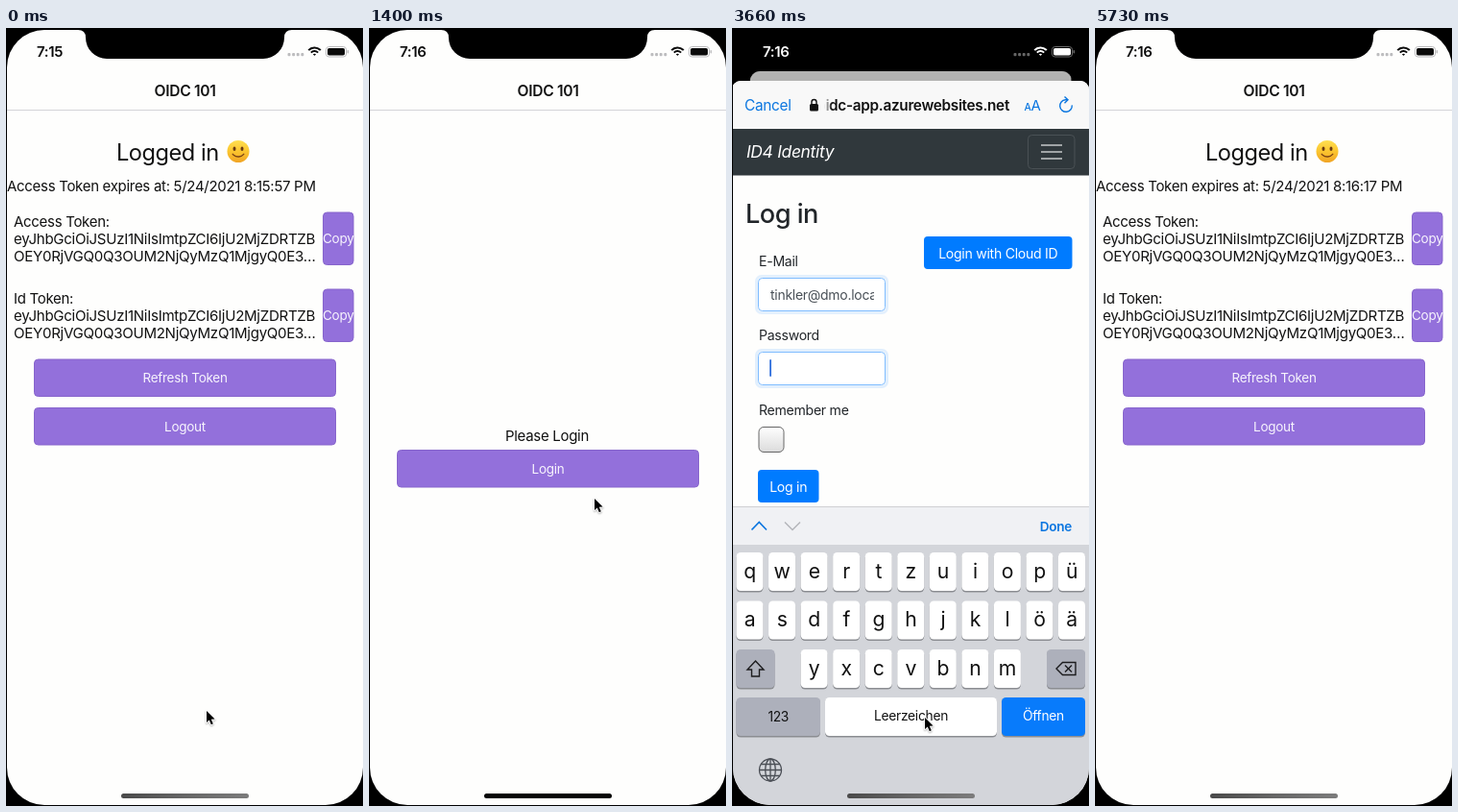
An HTML page with a canvas that plays this animation: 372x810 px, repeating every 5900 ms.

```html
<!DOCTYPE html>
<html lang="en">
<head>
<meta charset="utf-8">
<title>Sign-in flow</title>
<style>
html, body { margin: 0; width: 100%; height: 100%; overflow: hidden; background: #000; }
canvas { display: block; width: 372px; height: 810px; }
</style>
</head>
<body>
<canvas id="stage" width="372" height="810"></canvas>
<script>
const ctx = document.getElementById('stage').getContext('2d');
const LOOP = 5900, CX = 186.5;
const PURPLE = '#9370db', PAPER = '#fefefd', IOS_BLUE = '#0b76e0', WEB_BLUE = '#007bff';
const HOST = 'xamarinoidc-app.azurewebsites.net';
const EMAIL = 'tinkler@dmo.local';

const clamp = v => Math.max(0, Math.min(1, v));
const ramp = (t, from, to) => clamp((t - from) / (to - from));
const easeOut = x => 1 - (1 - x) ** 3;
const easeInOut = x => x * x * (3 - 2 * x);

const ALERTS = [[770, 1000], [1700, 1900]];
const SHEETS = [[1010, 1230, 1350], [1911, 4400, 4540]];
const LOGGED_OUT = [1360, 4730];
const PAGE_READY = 2240, PAGE_GONE = 4200;
const FOCUS_EMAIL = 2680, FOCUS_PASSWORD = 3640, SUBMIT = 3960;

// time, x, y of the pointer tip
const POINTER = [
  [400, 209, 711], [740, 175, 422], [830, 175, 422], [970, 235, 490],
  [1460, 235, 490], [1620, 205, 462], [1740, 205, 462], [1870, 245, 483],
  [2280, 245, 483], [2520, 96, 274], [2840, 96, 274], [3060, 201, 718]
];

function box(x, y, w, h, r, fill, stroke, width = 1) {
  ctx.beginPath();
  ctx.roundRect(x, y, w, h, r);
  if (fill) { ctx.fillStyle = fill; ctx.fill(); }
  if (stroke) { ctx.strokeStyle = stroke; ctx.lineWidth = width; ctx.stroke(); }
}

function disc(x, y, rx, ry, fill) {
  ctx.beginPath();
  ctx.ellipse(x, y, rx, ry, 0, 0, Math.PI * 2);
  ctx.fillStyle = fill;
  ctx.fill();
}

function line(points, color, width = 1, close = false) {
  ctx.beginPath();
  points.forEach(([x, y]) => ctx.lineTo(x, y));
  if (close) ctx.closePath();
  ctx.strokeStyle = color;
  ctx.lineWidth = width;
  ctx.stroke();
}

function text(str, x, y, size, color = '#111', align = 'left', weight = 400, style = '') {
  ctx.font = `${style} ${weight} ${size}px Inter, Roboto, sans-serif`;
  ctx.letterSpacing = `${-0.02 * size}px`;
  ctx.textAlign = align;
  ctx.fillStyle = color;
  ctx.fillText(str, x, y);
}

function gradient(x0, y0, x1, y1, ...colors) {
  const g = ctx.createLinearGradient(x0, y0, x1, y1);
  colors.forEach((c, i) => g.addColorStop(i / (colors.length - 1), c));
  return g;
}

function scoped(paint) {
  ctx.save();
  paint();
  ctx.restore();
}

function button(label, x, y, w, h) {
  box(x + 0.5, y + 0.5, w - 1, h - 1, 4, PURPLE, '#8765cc');
  text(label, x + w / 2, y + h / 2 + 4.8, 13.5, '#f7f4fd', 'center');
}

function smiley(x, y) {
  disc(x, y, 11.5, 11.5, gradient(0, y - 12, 0, y + 12, '#ffe052', '#fbc52f', '#f0a325'));
  disc(x - 4, y - 2.8, 1.5, 2.2, '#6d3c12');
  disc(x + 4, y - 2.8, 1.5, 2.2, '#6d3c12');
  ctx.beginPath();
  ctx.arc(x, y - 2, 7.5, 0.7, Math.PI - 0.7);
  ctx.strokeStyle = '#7d4414';
  ctx.lineWidth = 1.4;
  ctx.lineCap = 'round';
  ctx.stroke();
  ctx.lineCap = 'butt';
}

function tokenBlock(label, y) {
  text(label, 8, y + 15, 15);
  text('eyJhbGciOiJSUzI1NiIsImtpZCI6IjU2MjZDRTZB', 8, y + 33, 15.1);
  text('OEY0RjVGQ0Q3OUM2NjQyMzQ1MjgyQ0E3…', 8, y + 51.5, 15.1);
  button('Copy', 330, y, 32.5, 55.5);
}

function app(t) {
  ctx.fillStyle = PAPER;
  ctx.fillRect(0, 0, 372, 810);
  text('OIDC 101', CX, 70.5, 15.6, '#111', 'center', 600);
  line([[0, 85.5], [372, 85.5]], '#d3d3d8');
  const [out, back] = LOGGED_OUT;
  if (t >= out && t < back) {
    text('Please Login', CX - 1, 429.5, 15, '#111', 'center');
    button('Login', 29, 439, 315, 39.5);
    return;
  }
  text('Logged in', 115, 138, 23.6);
  smiley(242, 128.5);
  text(`Access Token expires at: 5/24/2021 ${t < out ? '8:15:57' : '8:16:17'} PM`, 1, 170, 15);
  tokenBlock('Access Token:', 191.5);
  tokenBlock('Id Token:', 271.5);
  button('Refresh Token', 29, 344.5, 315, 39.5);
  button('Logout', 29, 395, 315, 39.5);
}

function statusBar(t, color, dots) {
  text(t < 600 ? '7:15' : '7:16', 32, 30, 15, color, 'left', 600);
  for (let i = 0; i < 4; i++) box(293.5 + i * 4.6, 26, 3, 3.2, 1, dots);
  ctx.strokeStyle = color;
  ctx.lineWidth = 2;
  [1.2, 5, 8.6].forEach(r => {
    ctx.beginPath();
    ctx.arc(321.5, 29, r, -Math.PI * 0.76, -Math.PI * 0.24);
    ctx.stroke();
  });
  box(333.5, 19.5, 21, 10.5, 3, null, dots);
  box(335, 21, 18, 7.5, 1.8, color);
  box(355.5, 23, 1.6, 3.6, 1, dots);
}

function notch() {
  ctx.beginPath();
  ctx.moveTo(75, 0);
  ctx.lineTo(75, 2);
  ctx.quadraticCurveTo(83, 2, 83, 10);
  ctx.arcTo(83, 32, 106, 32, 22);
  ctx.lineTo(267, 32);
  ctx.arcTo(290, 32, 290, 10, 22);
  ctx.lineTo(290, 10);
  ctx.quadraticCurveTo(290, 2, 298, 2);
  ctx.lineTo(298, 0);
  ctx.fillStyle = '#000';
  ctx.fill();
}

function homeBar(t) {
  let fill = gradient(120, 0, 253, 0, '#4a4a4a', '#666', '#7c7c7c');
  if (t >= 770 && t < 1340) fill = '#6c6c6d';
  if (t >= 1340 && t < FOCUS_EMAIL) fill = '#050505';
  box(120, 797, 133, 5, 2.5, fill);
}

function alertBox(t, level) {
  const latest = ALERTS.filter(([from]) => t >= from).pop();
  const grow = t < latest[1] ? 1 + 0.18 * (1 - ramp(t, latest[0], latest[0] + 42)) : 1;
  scoped(() => {
    ctx.translate(CX, 413);
    ctx.scale(grow, grow);
    ctx.translate(-CX, -413);
    ctx.globalAlpha = level * 0.94;
    box(65, 320.5, 243, 185, 12.5, '#eeeef0');
    ctx.globalAlpha = Math.min(1, level * 1.15);
    ['“OidcSample” Wants to Use', '“xamarinoidc-', 'app.azurewebsites.net” to', 'Sign In']
      .forEach((s, i) => text(s, CX, 351.5 + i * 20, 15.5, '#161618', 'center', 600));
    text('This allows the app and website to', CX, 429.5, 12.2, '#161618', 'center');
    text('share information about you.', CX, 444, 12.2, '#161618', 'center');
    line([[65, 465.5], [308, 465.5]], '#c3c3c8');
    line([[CX, 465.5], [CX, 505]], '#c3c3c8');
    text('Cancel', 126, 491, 15.3, IOS_BLUE, 'center');
    text('Continue', 247, 491, 15.3, IOS_BLUE, 'center');
  });
}

function addressBar(secure) {
  box(0, 55, 372, 50, [9, 9, 0, 0], '#f8f8f8');
  line([[0, 105.5], [372, 105.5]], '#d6d6d8');
  text('Cancel', 13, 85.5, 15.4, IOS_BLUE);
  const left = secure ? 96 : 80;
  scoped(() => {
    ctx.beginPath();
    ctx.rect(left, 60, 292 - left, 40);
    ctx.clip();
    text(HOST, 289, 85.5, 15.35, '#111', 'right', 600);
    ctx.fillStyle = gradient(left, 0, left + 8, 0, '#f8f8f8', '#f8f8f800');
    ctx.fillRect(left, 60, 8, 40);
  });
  if (secure) {
    box(81, 79, 9, 7.5, 1.5, '#111');
    box(83, 74.5, 5, 8, 2.5, null, '#111', 1.4);
  }
  text('A', 304.5, 85.5, 10.3, IOS_BLUE, 'left', 500);
  text('A', 311.5, 85.5, 15, IOS_BLUE);
  ctx.beginPath();
  ctx.arc(348, 81, 6.3, -0.1, Math.PI * 1.56);
  ctx.strokeStyle = IOS_BLUE;
  ctx.lineWidth = 1.4;
  ctx.stroke();
  line([[346.5, 71.5], [350, 74.8], [346.5, 78.2]], IOS_BLUE, 1.4);
}

function field(y, focus, value, caret) {
  if (focus > 0) box(25.5, y - 1.5, 136, 38, 5, null, `rgba(0,123,255,${0.22 * focus})`, 3);
  box(27.5, y + 0.5, 132, 34, 4, '#fff', focus > 0 ? '#80bdff' : '#ced4da');
  scoped(() => {
    ctx.beginPath();
    ctx.rect(39, y, 109, 35);
    ctx.clip();
    text(value, 40, y + 22.5, 14, '#495057');
    const end = value ? ctx.measureText(value).width : 0;
    if (caret) box(39.2 + Math.min(end, 106), y + 8, 1.8, 18, 1, '#2f6fdc');
  });
}

function loginPage(t) {
  ctx.fillStyle = '#30383c';
  ctx.fillRect(0, 105, 372, 48.5);
  text('ID4 Identity', 15, 135, 17.5, '#fff', 'left', 400, 'italic');
  box(308.5, 111.5, 48.5, 35, 4, null, '#4a5155');
  [122, 129, 136].forEach(y => line([[322, y], [344, y]], '#a0a4a6', 1.8));
  text('Log in', 14, 202.5, 27.2, '#212529', 'left', 500);
  box(200, 217, 154.5, 34, 4, WEB_BLUE);
  text('Login with Cloud ID', 277.3, 239.5, 14.1, '#fff', 'center');

  const onEmail = t >= FOCUS_EMAIL && t < FOCUS_PASSWORD;
  const onPassword = t >= FOCUS_PASSWORD && t < SUBMIT;
  const blur = 1 - ramp(t, FOCUS_PASSWORD, FOCUS_PASSWORD + 40);
  const typed = EMAIL.slice(0, Math.round(EMAIL.length * ramp(t, 2900, 3580)));
  const dots = '•'.repeat(Math.round(9 * ramp(t, 3700, 3900)));
  text('E-Mail', 28, 247.5, 14.1, '#212529');
  field(260, t < FOCUS_EMAIL ? 0 : blur, typed, onEmail);
  text('Password', 28, 325, 14.1, '#212529');
  field(337, onPassword ? ramp(t, FOCUS_PASSWORD, FOCUS_PASSWORD + 40) : 0, dots, onPassword);
  text('Remember me', 28, 402.5, 14.1, '#212529');
  box(28, 415.5, 26, 26, 5, gradient(0, 415, 0, 441, '#fff', '#dcdcdc'), '#666');
  box(27, 460, 63.5, 34, 4, WEB_BLUE);
  text('Log in', 58.7, 482.5, 14.1, '#fff', 'center');
}

function key(x, y, w, fill, label = '', size = 13.8, color = '#111', drop = 25) {
  box(x, y + 1, w, 40.5, 4.5, '#8b8d92');
  box(x, y, w, 40, 4.5, fill);
  if (label) text(label, x + w / 2, y + drop, size, color, 'center');
}

function keyboard() {
  const gray = '#adb0bb', ink = '#1c1c1e';
  ctx.fillStyle = '#d3d5da';
  ctx.fillRect(0, 498, 372, 312);
  ctx.fillStyle = '#f0f1f4';
  ctx.fillRect(0, 498, 372, 40);
  line([[0, 498.5], [372, 498.5]], '#cfd0d3');
  line([[20.5, 522.5], [28.3, 514.5], [36, 522.5]], IOS_BLUE, 1.7);
  line([[55, 514.5], [63, 522.5], [71, 514.5]], '#b4b6ba', 1.5);
  text('Done', 354, 523.5, 13.6, IOS_BLUE, 'right', 600);
  [['qwertzuiopü', 0, 546], ['asdfghjklöä', 0, 596.5], ['yxcvbnm', 2, 647]].forEach(([row, start, y]) =>
    [...row].forEach((c, i) => key(4.5 + 33.55 * (start + i), y, 28, '#fff', c, 21.2, '#111', 26.5)));

  key(4.5, 647, 40, gray);
  line([[24.5, 659], [33, 668], [28.5, 668], [28.5, 675], [20.5, 675], [20.5, 668], [16, 668]], ink, 1.4, true);
  key(328, 647, 40, gray);
  line([[338, 667], [344.5, 660.5], [358, 660.5], [358, 673.5], [344.5, 673.5]], ink, 1.4, true);
  line([[347, 663.5], [354, 670.5]], ink, 1.4);
  line([[354, 663.5], [347, 670.5]], ink, 1.4);
  key(4.5, 697, 87.5, gray, '123');
  key(97, 697, 179, '#fff', 'Leerzeichen', 13.8, '#111', 24);
  key(281, 697, 87, '#087bfb', 'Öffnen', 13.8, '#fff', 24);

  ctx.strokeStyle = '#4b4f56';
  ctx.lineWidth = 1.3;
  [11.5, 5.3].forEach(rx => {
    ctx.beginPath();
    ctx.ellipse(40, 772.5, rx, 11.5, 0, 0, Math.PI * 2);
    ctx.stroke();
  });
  line([[40, 761], [40, 784]], '#4b4f56', 1.3);
  [[766.5, 10], [772.5, 11.5], [778.5, 10]].forEach(([y, w]) => line([[40 - w, y], [40 + w, y]], '#4b4f56', 1.3));
}

function sheet(t, p) {
  const top = 810 - 755 * p;
  if (p < 1) {
    const edge = clamp(top / 54) * 54;
    box(13, top - edge, 347, edge + 10, [30, 30, 0, 0],
      gradient(0, top - edge, 0, top, 'rgba(190,200,180,.1)', 'rgba(180,200,198,.3)'));
  }
  scoped(() => {
    ctx.translate(0, top - 55);
    box(0, 55, 372, 760, [9, 9, 0, 0], PAPER);
    const ready = t >= PAGE_READY;
    addressBar(ready);
    if (ready && t < PAGE_GONE) loginPage(t);
    const raised = easeOut(ramp(t, FOCUS_EMAIL, 2760)) * (1 - ramp(t, 4040, 4110));
    if (raised > 0) {
      ctx.translate(0, 312 * (1 - raised));
      keyboard();
    }
  });
}

function pointer(t) {
  if (t >= 5700) return;
  let [, x, y] = POINTER[0];
  for (let i = 1; i < POINTER.length; i++) {
    const [t0, x0, y0] = POINTER[i - 1], [t1, x1, y1] = POINTER[i];
    if (t < t0) break;
    const k = easeInOut(ramp(t, t0, t1));
    x = x0 + (x1 - x0) * k;
    y = y0 + (y1 - y0) * k;
  }
  scoped(() => {
    ctx.translate(x, y);
    ctx.lineJoin = 'round';
    const arrow = [[0, 0], [0, 12], [2.8, 9.5], [4.8, 14.2], [6.8, 13.3], [4.8, 8.8], [8.6, 8.6]];
    ctx.shadowColor = 'rgba(0,0,0,.3)';
    ctx.shadowBlur = 2;
    ctx.shadowOffsetY = 1;
    line(arrow, '#fff', 1.8, true);
    ctx.shadowColor = 'transparent';
    ctx.fillStyle = '#000';
    ctx.fill();
  });
}

function draw(t) {
  const p = Math.max(...SHEETS.map(([up, down, gone]) =>
    easeOut(ramp(t, up, up + 150)) * (1 - easeInOut(ramp(t, down, gone)))));
  const level = Math.max(...ALERTS.map(([from, to]) =>
    ramp(t, from, from + 42) * (1 - ramp(t, to, to + 65))));

  ctx.fillStyle = '#000';
  ctx.fillRect(0, 0, 372, 810);
  scoped(() => {
    ctx.beginPath();
    ctx.roundRect(1, 2, 371, 807, 39);
    ctx.clip();
    scoped(() => {
      const scale = 1 - 0.1 * p;
      ctx.translate(CX, 2 + 43 * p);
      ctx.scale(scale, scale);
      ctx.translate(-CX, -2);
      ctx.beginPath();
      ctx.roundRect(0, 2, 373, 808, p > 0 ? 12 : 0);
      ctx.clip();
      app(t);
      ctx.fillStyle = `rgba(0,0,0,${0.3 * p ** 3.7})`;
      ctx.fillRect(0, 0, 373, 810);
    });
    if (p > 0) {
      scoped(() => {
        ctx.globalAlpha = p ** 3;
        statusBar(t, '#fff', '#666');
      });
    } else {
      statusBar(t, '#0a0a0a', '#bdbdbf');
    }
    ctx.fillStyle = `rgba(0,0,30,${0.2 * level})`;
    ctx.fillRect(0, 0, 372, 810);
    if (p > 0) sheet(t, p);
    if (level > 0) alertBox(t, level);
    homeBar(t);
    notch();
  });
  pointer(t);
}

const start = performance.now();
function tick() {
  draw((performance.now() - start) % LOOP);
  requestAnimationFrame(tick);
}
tick();
</script>
</body>
</html>
```
